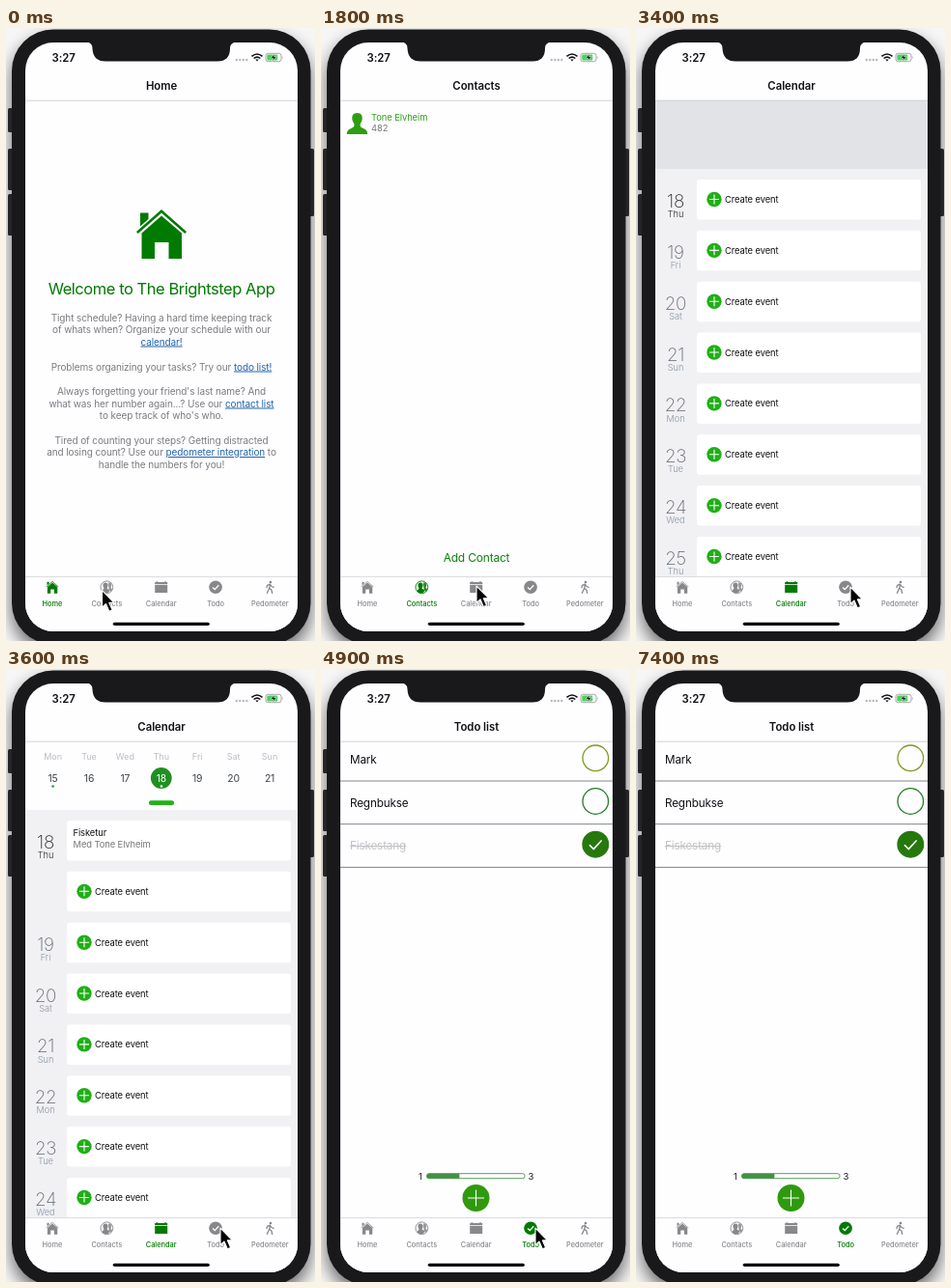
An HTML page for the animation above (7600 ms loop, 320 px wide and 635 px high).

```html
<!DOCTYPE html>
<html lang="en">
<head>
<meta charset="utf-8">
<title>Phone app tour</title>
<style>
  html, body { margin: 0; width: 100%; height: 100%; overflow: hidden; background: #f6f6f7; }
  svg { display: block; width: 100%; height: 100%; }
  text { font-family: Inter, sans-serif; white-space: pre; }
  .mid { text-anchor: middle; }
  .title { font-size: 11.4px; font-weight: 600; fill: #111; letter-spacing: -.05px; }
  .label { font-size: 7.4px; font-weight: 500; }
  .hero { font-size: 16.5px; letter-spacing: -.45px; fill: #007a00; }
  .copy { font-size: 10px; letter-spacing: -.1px; fill: #7b7b7e; }
  .link { fill: #2565a8; text-decoration: underline; }
  .item { font-size: 9.4px; letter-spacing: -.09px; fill: #111; }
  .add { font-size: 12px; letter-spacing: -.2px; fill: #0b820b; }
  .date { font-size: 18.8px; font-weight: 250; letter-spacing: -.3px; }
  .day { font-size: 9.2px; font-weight: 300; }
  .week { font-size: 9px; fill: #b8bfc6; }
  .num { font-size: 10.4px; letter-spacing: -.2px; fill: #3c4650; }
  .todo { font-size: 11.7px; letter-spacing: -.15px; fill: #111; }
  .count { font-size: 9.6px; fill: #222; }
</style>
</head>
<body>
<svg viewBox="0 0 320 635" xmlns="http://www.w3.org/2000/svg">
  <defs>
    <filter id="blur" filterUnits="userSpaceOnUse" x="-40" y="-40" width="400" height="740">
      <feGaussianBlur stdDeviation="9"/>
    </filter>
    <clipPath id="screen"><rect x="20" y="15" width="282" height="610" rx="29"/></clipPath>
    <clipPath id="agenda"><rect x="20" y="146" width="282" height="422"/></clipPath>
    <g id="house">
      <path d="M135 211 161 188 187 211 185.300 213 161 191.500 136.700 213Z"/>
      <path d="M139 191.500h8.500v6.500l-8.500 7.400Z"/>
      <path d="M140.500 212.500 161 194.500 182 212.500V239H168.500V222H154V239H140.500Z"/>
    </g>
    <g id="people">
      <circle r="6.400" fill="none" stroke="currentColor" stroke-width=".9"/>
      <path d="M1.500-4.600c2-.8 3.700.5 3.400 2.500-.1 1.500-.8 2.300-.8 2.300l1.900 2.200-1.800 2.300-2-1.900Z" opacity=".85"/>
      <path d="M-1.500-4.700c2 0 3 1.400 2.700 3.200-.2 1.300-.9 1.800-.9 2.600 0 .7 2.500 1 2.800 2.600l-1.700 2C-.8 6.400-3 6-4.900 4.200c.2-1.700 2-2.200 2-3 0-.8-.9-1.400-1-2.700-.3-1.900.7-3.200 2.400-3.200Z"/>
    </g>
    <path id="month" d="M-6.500-5.200h1.400v-.9h1.600v.9h7v-.9h1.600v.9h1.400v2h-13ZM-6.500-2.600h13v8.300h-13Z"/>
    <g id="done">
      <circle r="6.800"/>
      <path d="M-3 .2-.8 2.300 3.200-2" fill="none" stroke="#fff" stroke-width="1.300"/>
    </g>
    <g id="walk" fill="none" stroke="currentColor" stroke-width="1.300" stroke-linecap="round" stroke-linejoin="round">
      <circle cx=".6" cy="-5.300" r=".7"/>
      <path d="M-3.400.2-2.900-2 0-3.200 1.600-.8 3.800 0M0-3-.7 1-3 6M-.7 1 1.500 2.700 2.300 6"/>
    </g>
    <rect id="body" x="6" y="1.500" width="309.500" height="637" rx="43"/>
  </defs>
  <rect width="320" height="635" fill="#f6f6f7"/>
  <use href="#body" y="9" filter="url(#blur)" opacity=".58"/>
  <g fill="#242426">
    <rect x="2" y="83" width="7" height="25" rx="1.500"/>
    <rect x="2" y="125" width="7" height="43" rx="1.500"/>
    <rect x="2" y="172" width="7" height="43" rx="1.500"/>
    <rect x="312" y="125" width="7" height="70" rx="1.500"/>
  </g>
  <use href="#body" fill="#19191b"/>
  <rect x="20" y="15" width="282" height="610" rx="29" fill="#fefdff"/>
  <g clip-path="url(#screen)">
    <g id="pages"></g>
    <path d="M20 75.200H302" stroke="#cfcfd2" stroke-width=".9"/>
    <g id="tabs"></g>
  </g>
  <path d="M83 14.500Q89.500 15 89.500 21 90 34.500 103 34.500H219Q232 34.500 232 21 232 15 239 14.500Z" fill="#19191b"/>
  <g id="status">
    <text class="title" x="47.500" y="34.500">3:27</text>
    <g fill="#b9b9bc">
      <circle cx="238.800" cy="33" r="1.200"/><circle cx="242.300" cy="33" r="1.200"/>
      <circle cx="245.800" cy="33" r="1.200"/><circle cx="249.300" cy="33" r="1.200"/>
    </g>
    <g fill="none" stroke="#111" stroke-width="1.600">
      <path d="M254.500 29.300Q260 24.700 265.500 29.300M256.600 31.500Q260 28.700 263.400 31.500"/>
      <path d="M258.300 32.500h3.400L260 34.500Z" fill="#111" stroke="none"/>
    </g>
    <rect x="269" y="26.300" width="16" height="8.400" rx="2.300" fill="#fff" stroke="#8d8d90" stroke-width=".8"/>
    <rect x="270.300" y="27.600" width="11" height="5.800" rx="1.200" fill="#45d35c"/>
    <path d="M286.300 29v3q1.200-1.500 0-3Z" fill="#8d8d90"/>
    <path d="M278.500 26.500 274 31.200h2.800l-1 3.300 4.400-4.800h-2.700Z" fill="#111" stroke="#fff" stroke-width=".5"/>
  </g>
  <rect x="110.800" y="615.700" width="100" height="3.300" rx="1.650" fill="#050505"/>
  <path id="cursor" d="M0 0V17.500L4 13.800 7.300 21.600 10.600 20.200 7.300 12.700H12.500Z" fill="#050505" stroke="#fff" stroke-width="1.100" stroke-linejoin="round"/>
</svg>
<script>
const $ = id => document.getElementById(id);
const LOOP = 7600, STEP = 100, ROW = 52.85;
const GREEN = '#007a00', GREY = '#88888b';
const PERSON = 'Tone Elvheim';

const text = (x, y, cls, s, extra = '') => `<text x="${x}" y="${y}" class="${cls}" ${extra}>${s}</text>`;
const mid = (x, y, cls, s, extra) => text(x, y, cls + ' mid', s, extra);
const title = s => mid(161, 64, 'title', s);
const link = s => `<tspan class="link">${s}</tspan>`;
const plus = (x, y, r, arm, fill) =>
  `<circle cx="${x}" cy="${y}" r="${r}" fill="${fill}"/>` +
  `<path d="M${x - arm} ${y}h${2 * arm}M${x} ${y - arm}v${2 * arm}" stroke="#fff" stroke-width="1.1"/>`;

function home() {
  const lines = [
    [300, 'Tight schedule? Having a hard time keeping track'],
    [312.5, 'of whats when? Organize your schedule with our'],
    [325, link('calendar!')],
    [351, 'Problems organizing your tasks? Try our ' + link('todo list!')],
    [376.5, 'Always forgetting your friend\'s last name? And'],
    [389, 'what was her number again...? Use our ' + link('contact list')],
    [401.5, 'to keep track of who\'s who.'],
    [427, 'Tired of counting your steps? Getting distracted'],
    [439.5, 'and losing count? Use our ' + link('pedometer integration') + ' to'],
    [452, 'handle the numbers for you!']
  ];
  return title('Home') + `<use href="#house" fill="${GREEN}"/>` +
    mid(161, 276.2, 'hero', 'Welcome to The Brightstep App') +
    lines.map(([y, s]) => mid(161, y + 3.5, 'copy', s)).join('');
}

function contacts() {
  return title('Contacts') +
    '<path d="M37.500 88c4 0 5.600 2.800 5.200 6.300-.2 2.300-1.200 3.600-2 5-.5 3 .8 3.800 3.600 4.900 2.600 1 3.700 2.300 3.900 5.800H26.800c.2-3.500 1.300-4.800 3.900-5.800 2.800-1.100 4.100-1.900 3.600-4.900-.8-1.400-1.800-2.700-2-5C31.900 90.800 33.500 88 37.500 88Z" fill="#2f9d12"/>' +
    text(52, 96, 'item', PERSON, 'style="fill:#2fa018"') +
    text(52, 107.3, 'item', '482', 'style="fill:#77777a"') +
    mid(161, 553, 'add', 'Add Contact');
}

const DAYS = ['Mon', 'Tue', 'Wed', 'Thu', 'Fri', 'Sat', 'Sun'];

function agendaRow(i, date, event) {
  const y = 157 + i * ROW;
  const [dark, light] = date === 18 ? ['#2c2c2e', '#2c2c2e'] : ['#686d72', '#8797a5'];
  let s = `<rect x="63" y="${y}" width="232" height="41.500" rx="3" fill="#fff"/>`;
  if (date) {
    s += mid(41, y + 29, 'date', date, `fill="${dark}"`) +
      mid(41, y + 39.2, 'day', DAYS[(date - 15) % 7], `fill="${light}"`);
  }
  return s + (event
    ? text(69.5, y + 16.3, 'item', 'Fisketur') + text(69.5, y + 28, 'item', 'Med ' + PERSON, 'style="fill:#77777a"')
    : plus(81, y + 20.5, 7.7, 5, '#1faf16') + text(92, y + 24, 'item', 'Create event'));
}

function calendar(loaded) {
  let strip = `<rect x="20" y="75" width="282" height="71" fill="${loaded ? '#fefdff' : '#e1e3e6'}"/>`;
  if (loaded) {
    strip += '<circle cx="160.800" cy="113" r="10.900" fill="#1f9020"/>';
    DAYS.forEach((d, i) => {
      const x = 48.6 + i * 37.4;
      strip += mid(x, 94, 'week', d) + mid(x, 116.8, 'num', 15 + i, i === 3 ? 'style="fill:#fff"' : '');
    });
    strip += '<circle cx="48.600" cy="121.500" r="1.300" fill="#1fa01f"/><circle cx="161" cy="121.500" r="1.300" fill="#fff"/>' +
      '<rect x="148" y="136.200" width="26" height="4.800" rx="2" fill="#23b016"/>';
  }
  const rows = Array.from({ length: 8 }, (_, i) => {
    const date = !loaded || i === 0 ? 18 + i : i === 1 ? 0 : 17 + i;
    return agendaRow(i, date, loaded && i === 0);
  }).join('');
  return '<rect x="20" y="75" width="282" height="493" fill="#f1f0f3"/>' + title('Calendar') + strip +
    `<g clip-path="url(#agenda)">${rows}</g>`;
}

function todo() {
  const tasks = [['Mark', '#7d9a20'], ['Regnbukse', '#217c23'], ['Fiskestang', '#26780d']];
  const list = tasks.map(([name, color], i) => {
    const y = 92.3 + i * 44.7, done = i === 2;
    return text(30, y + 5.6, 'todo', name, done ? 'style="fill:#c3c3c6;text-decoration:line-through"' : '') +
      `<circle cx="284.300" cy="${y}" r="13.300" fill="${done ? color : 'none'}" stroke="${color}" stroke-width="1.300"/>` +
      (done ? `<path d="M278 ${y + .5}l4.300 4.300 8.300-9" fill="none" stroke="#fff" stroke-width="1.600"/>` : '') +
      `<path d="M20 ${y + 23.7}H302" stroke="#77777a" stroke-width=".9"/>`;
  }).join('');
  return title('Todo list') + list +
    mid(103, 528.6, 'count', 1) + mid(217.5, 528.6, 'count', 3) +
    '<rect x="109.500" y="522.700" width="101.500" height="5" rx="2.200" fill="#fff" stroke="#55a056"/>' +
    '<path d="M111.700 522.700H143.300v5H111.700a2.200 2.500 0 0 1 0-5Z" fill="#439145"/>' +
    plus(160.5, 548, 14, 8.5, '#309a0e');
}

const pages = [home(), contacts(), calendar(false), calendar(true), todo()];
$('pages').innerHTML = pages.map(p => `<g>${p}</g>`).join('');

const tabs = [['Home', 'house'], ['Contacts', 'people'], ['Calendar', 'month'], ['Todo', 'done'], ['Pedometer', 'walk']];
$('tabs').innerHTML = '<rect x="20" y="568" width="282" height="57" fill="#fefdff"/>' +
  '<path d="M20 568.500H302" stroke="#d3d3d6" stroke-width=".8"/>' +
  tabs.map(([name, icon], i) => {
    const x = 48 + i * 56.35;
    const fit = icon === 'house' ? 'scale(.25) translate(-161 -213.500)' : '';
    return `<g class="tab"><use href="#${icon}" transform="translate(${x} 579.300) ${fit}"/>${mid(x, 598.6, 'label', name)}</g>`;
  }).join('');

const pageEls = [...$('pages').children];
const tabEls = [...document.querySelectorAll('.tab')];
const starts = [0, 900, 3000, 3500, 4700];
const tabOf = [0, 1, 2, 2, 3];

// time, x, y of the pointer tip
const route = [
  [0, 99.5, 582.7], [800, 100, 582.7], [1000, 139.5, 581], [1300, 161, 578],
  [2800, 161, 578], [2900, 190, 578], [3200, 222, 579.2], [4900, 222, 579.2],
  [5400, 224, 588], [5500, 226, 604], [5600, 227, 640]
];

function pointer(t) {
  const i = route.findIndex(p => p[0] > t);
  if (i < 0) return null;
  const [t0, x0, y0] = route[i - 1], [t1, x1, y1] = route[i];
  const k = (t - t0) / (t1 - t0);
  return [x0 + (x1 - x0) * k, y0 + (y1 - y0) * k];
}

function draw(ms) {
  const t = Math.floor(ms % LOOP / STEP) * STEP;
  const page = starts.filter(s => s <= t).length - 1;
  pageEls.forEach((el, i) => { el.style.display = i === page ? '' : 'none'; });
  tabEls.forEach((el, i) => {
    const color = i === tabOf[page] ? GREEN : GREY;
    el.style.fill = el.style.color = color;
  });
  const p = pointer(t);
  $('cursor').style.display = p ? '' : 'none';
  if (p) $('cursor').setAttribute('transform', `translate(${p[0]} ${p[1]})`);
}

const begin = performance.now();
function tick() {
  draw(performance.now() - begin);
  requestAnimationFrame(tick);
}
tick();
</script>
</body>
</html>
```
